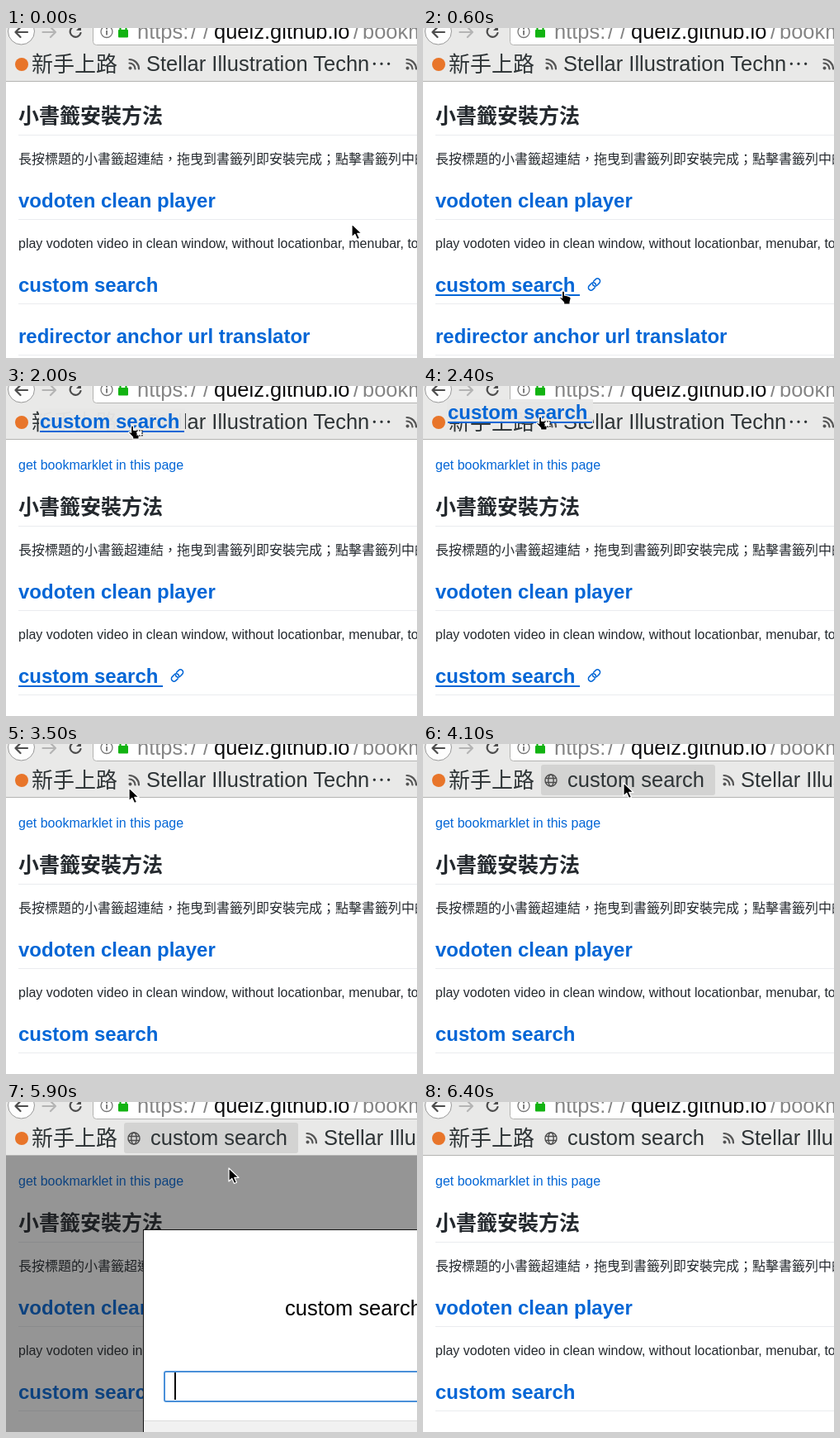
An HTML page that plays this animation: 498x399 px, repeating every 6.6 s.

```html
<!DOCTYPE html>
<html lang="zh-TW">
<head>
<meta charset="utf-8">
<title>Bookmarklet install</title>
<style>
  html, body { margin: 0; width: 100%; height: 100%; overflow: hidden; background: #fff; }
  svg { display: block; width: 498px; height: 399px; }
  text { white-space: pre; font-family: "Liberation Sans", "Noto Sans CJK TC", "Noto Sans CJK", "Noto Sans CJK JP", sans-serif; }
  .ui { font-size: 25.5px; fill: #2e3436; }
  .cjk { font-size: 26px; font-family: "Noto Sans CJK TC", "Noto Sans CJK", "Noto Sans CJK JP", sans-serif; }
  .body { font-size: 16px; fill: #24292e; }
  .head { font-size: 24px; font-weight: bold; fill: #0366d6; }
  .title { font-size: 25px; fill: #24292e; }
  .link { fill: #0366d6; }
  .dim { fill: #858585; }
  .line { fill: none; stroke-linecap: round; stroke-linejoin: round; }
</style>
</head>
<body>
<svg viewBox="0 0 498 399">
  <defs>
    <g id="feed" class="line" stroke="#555" stroke-width="2.2">
      <circle cx="2.5" cy="11.5" r="2" fill="#555" stroke="none"/>
      <path d="M1.5 5.5a7 7 0 0 1 7 7M1.5 1a11.5 11.5 0 0 1 11.5 11.5"/>
    </g>
    <path id="half" d="M-1 3.2h-3.5a3.2 3.2 0 0 1 0-6.4h4a3.2 3.2 0 0 1 2.6 5"/>
    <g id="drag">
      <text class="head" x="15" y="319">custom search </text>
      <rect class="link" x="15" y="322" width="175" height="2"/>
    </g>
    <path id="arrow" d="M0 0v16l3.8-3.5 2.7 6 3-1.3-2.7-5.8h5.2z"/>
    <path id="hand" d="M-1.5 1q1.5-2 3 0v4.2l2.2.3 2.2.6 2 .8q1.6.6 1.2 2.6l-1 4v2.5h-7.5v-2l-4.6-5q-.9-1.8 1-1.9l1.5 1.2z"/>
  </defs>

  <rect width="498" height="399" fill="#fff"/>
  <g id="page">
    <text class="body link" x="15" y="61">get bookmarklet in this page</text>
    <text class="head title" x="15" y="115">小書籤安裝方法</text>
    <text class="body" x="15" y="163.5">長按標題的小書籤超連結，拖曳到書籤列即安裝完成；點擊書籤列中的</text>
    <text class="head" x="15" y="217">vodoten clean player</text>
    <text class="body" x="15" y="266">play vodoten video in clean window, without locationbar, menubar, toolbar</text>
    <text class="head" x="15" y="319">custom search</text>
    <text class="head" x="15" y="381">redirector anchor url translator</text>
    <path d="M15 129.500H498M15 231.500H498M15 333.500H498M15 395.500H498" stroke="#eaecef"/>
    <g id="hover">
      <rect class="link" x="15" y="322" width="175" height="2"/>
      <g class="line" stroke="#0366d6" stroke-width="1.5" transform="translate(207.500 310) rotate(-45)">
        <use href="#half" x="-1"/><use href="#half" x="-1" transform="rotate(180)"/>
      </g>
    </g>
  </g>

  <rect width="498" height="64" fill="#e9e9e8"/>
  <rect y="64" width="498" height="1" fill="#b4b4b2"/>
  <rect x="105.500" y="-20" width="420" height="40.500" rx="4" fill="#fff" stroke="#b3b3b1"/>
  <circle cx="18.500" cy="4" r="16" fill="#fdfdfd" stroke="#999"/>
  <g class="line" stroke="#4c4c4c" stroke-width="2.200">
    <path d="M11.500 5H26M17.500-1l-6 6 6 6"/>
    <path d="M44.500 5H60M54-1l6 6-6 6" stroke="#b4b4b4"/>
    <path d="M90.500 6a6.500 6.500 0 1 1-2-6.500"/>
    <path d="M91-3v6h-6z" fill="#4c4c4c" stroke="none"/>
  </g>
  <circle cx="122" cy="4.500" r="7" fill="none" stroke="#777" stroke-width="1.300"/>
  <path d="M121.200 3h1.700v5.500h-1.700zM121.200 0h1.700v1.700h-1.700z" fill="#666"/>
  <rect x="136" y="2" width="12" height="9.500" rx="1" fill="#12b312"/>
  <path d="M138.500 3V-1a3.500 3.500 0 0 1 7 0v4" fill="none" stroke="#12b312" stroke-width="2.200"/>
  <g class="ui">
    <g class="dim">
      <text x="159" y="13">https:</text><text x="224" y="13">/</text><text x="239" y="13">/</text>
      <text x="421" y="13">/</text><text x="432" y="13">bookmarklet</text>
    </g>
    <text x="252" y="13" fill="#0c0c0d">quelz.github.io</text>
  </g>

  <circle cx="19" cy="44" r="8" fill="#e8752a"/>
  <text class="ui cjk" x="31" y="53">新手上路</text>
  <g id="added">
    <rect id="highlight" x="143" y="25" width="211" height="37" rx="3" fill="#d3d3d2"/>
    <g class="line" stroke="#4c4c4c" stroke-width="1.400">
      <circle cx="155" cy="44" r="7"/><ellipse cx="155" cy="44" rx="3.200" ry="7"/>
      <path d="M148.500 41.500h13M148.500 46.500h13"/>
    </g>
    <text class="ui" x="175" y="52">custom search</text>
  </g>
  <g id="feeds">
    <use href="#feed" x="148" y="37"/>
    <text class="ui" x="170" y="52">Stellar Illustration Techn</text>
    <text class="ui cjk" x="442" y="53">⋯</text>
    <use href="#feed" x="484" y="37"/>
  </g>

  <g id="dialog">
    <rect y="65" width="498" height="334" fill="#1a1a1a" fill-opacity=".46"/>
    <rect x="166.500" y="154.500" width="340" height="260" fill="#fff" stroke="#111"/>
    <text class="ui" x="338" y="258" style="fill:#000">custom search</text>
    <rect x="192" y="326" width="320" height="36" rx="2" fill="#fff" stroke="#4a90d9" stroke-width="2"/>
    <rect id="caret" x="204" y="327" width="2" height="33" fill="#000"/>
    <rect x="167" y="385" width="331" height="14" fill="#f1f1f1"/>
    <rect x="167" y="385" width="331" height="1" fill="#dcdcdc"/>
  </g>

  <g id="ghost">
    <rect x="14" y="295" width="177" height="29" fill="#e8e8e7" fill-opacity=".96"/>
    <use href="#drag"/>
  </g>
  <g id="cursor" stroke="#fff" stroke-width="1.200" stroke-linejoin="round">
    <use id="pointer"/>
    <rect id="badge" x="5" y="6" width="7" height="6" fill="#fff" stroke="#000" stroke-dasharray="2 1"/>
  </g>
</svg>
<script>
const LOOP = 6600;
const el = id => document.getElementById(id);

// time, x, y of the pointer tip, shape
const moves = [
  [0, 419, 237, 'arrow'], [100, 400, 252, 'arrow'], [200, 340, 294, 'arrow'],
  [300, 270, 320, 'arrow'], [400, 215, 324, 'arrow'], [500, 184, 321, 'hand'],
  [600, 170, 318, 'hand'], [800, 162, 318, 'hand'], [900, 148, 318, 'hand'],
  [1000, 136, 318, 'hand'], [1100, 130, 317, 'hand'], [1300, 128, 317, 'hand'],
  [1400, 127, 316, 'hand'], [1600, 133, 280, 'arrow'], [1700, 144, 215, 'arrow'],
  [1800, 151, 152, 'arrow'], [1900, 152, 92, 'arrow'], [2000, 153, 48, 'drop'],
  [2100, 154, 23, 'drop'], [2300, 147, 31, 'drop'], [2400, 142, 37, 'drop'],
  [3000, 149, 53, 'arrow'], [3900, 176, 57, 'arrow'], [4000, 219, 52, 'arrow'],
  [4100, 243, 47, 'arrow'], [5900, 270, 80, 'arrow'], [6000, 330, 160, 'arrow'],
  [6100, 405, 260, 'arrow'], [6200, 470, 350, 'arrow'], [6300, 540, 420, 'arrow']
];

const show = (id, on) => el(id).setAttribute('visibility', on ? 'inherit' : 'hidden');
const place = (id, x, y) => el(id).setAttribute('transform', `translate(${x} ${y})`);

function draw(now) {
  const t = now % LOOP;
  const within = (from, to) => t >= from && t < to;
  const [, x, y, shape] = moves.findLast(move => move[0] <= t);

  place('page', 0, t >= 2000 ? 40 : 0);
  place('feeds', t >= 3600 ? 215 : 0, 0);
  place('ghost', x - 127, y - 316);
  place('cursor', x, y);
  el('pointer').setAttribute('href', shape === 'arrow' ? '#arrow' : '#hand');

  show('badge', shape === 'drop');
  show('hover', within(500, 3500));
  show('ghost', within(1600, 3000));
  show('added', t >= 3600);
  show('highlight', within(3900, 6400));
  if (t < 3900) show('highlight', false);
  show('dialog', within(4600, 6400));
  el('caret').setAttribute('opacity', within(5200, 5800) ? 0 : 1);
}

const start = performance.now();
function tick() {
  draw(performance.now() - start);
  requestAnimationFrame(tick);
}
tick();
</script>
</body>
</html>
```
